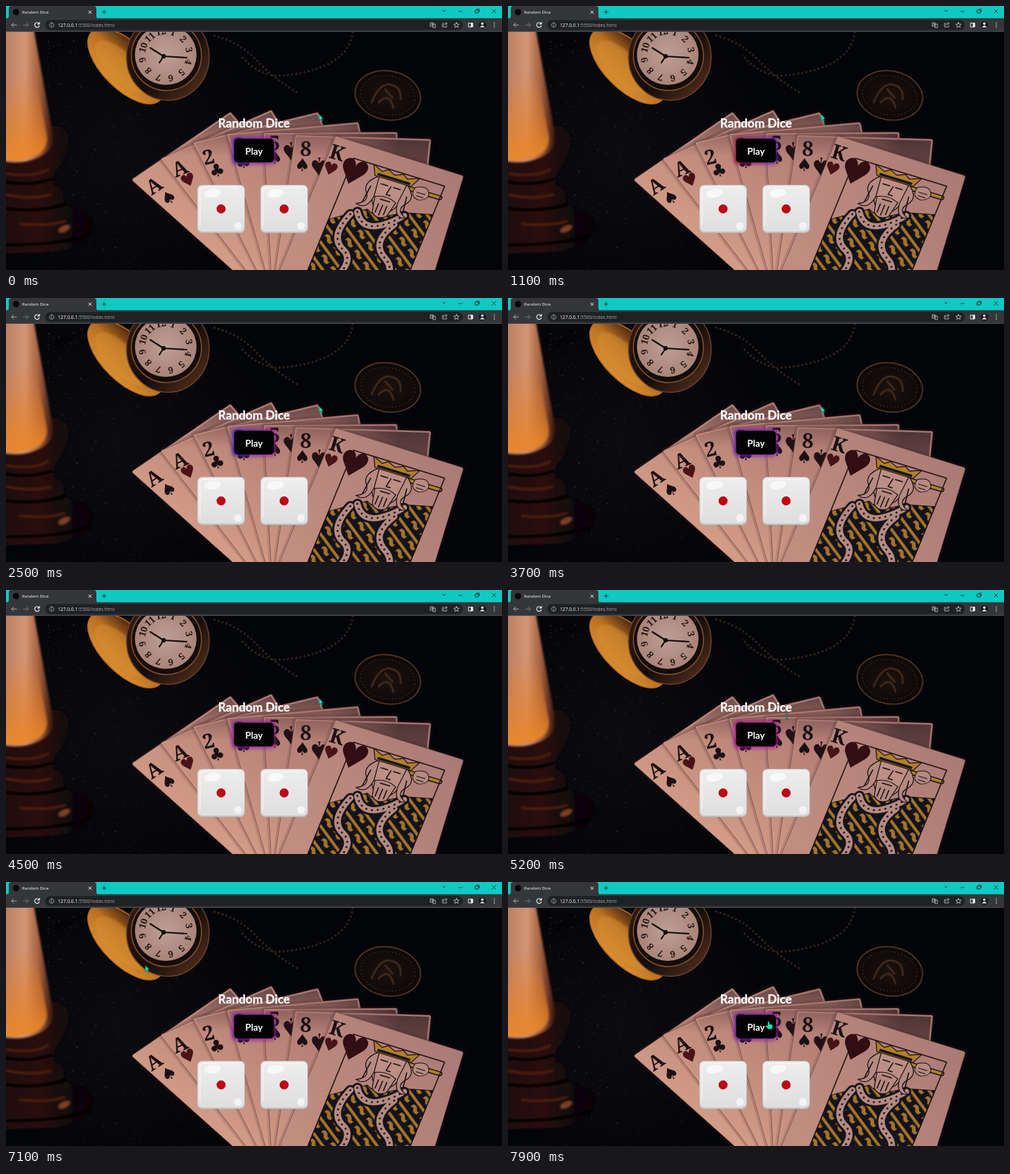
Write an HTML page that moves like this. It is 708 px wide and 378 px high and loops after 8000 ms.

```html
<!DOCTYPE html>
<html lang="en">
<head>
<meta charset="utf-8">
<title>Random Dice</title>
<style>
  html, body { margin: 0; width: 100%; height: 100%; overflow: hidden; background: #030408; }
  svg { display: block; width: 708px; height: 378px; }
  .ui { font-family: "Open Sans", "Noto Sans", sans-serif; }
  .page { font-family: Lato, sans-serif; font-weight: 700; fill: #fff; text-anchor: middle; }
  .rank { font-family: "Noto Serif", serif; font-weight: 600; text-anchor: middle; }
  .suit { font-family: "DejaVu Sans", sans-serif; text-anchor: middle; }
  .line { fill: none; stroke-linecap: round; stroke-linejoin: round; }
</style>
</head>
<body>
<svg viewBox="0 0 708 378">
  <defs>
    <radialGradient id="table" gradientUnits="userSpaceOnUse" cx="160" cy="210" r="230">
      <stop stop-color="#0b0b10"/><stop offset="1" stop-color="#030408"/>
    </radialGradient>
    <linearGradient id="wax">
      <stop stop-color="#b87a5e"/><stop offset=".45" stop-color="#d39574"/>
      <stop offset=".72" stop-color="#a3603f"/><stop offset="1" stop-color="#33140d"/>
    </linearGradient>
    <linearGradient id="waxGlow" x2="0" y2="1">
      <stop offset=".35" stop-color="#e67a20" stop-opacity="0"/><stop offset="1" stop-color="#e8872c"/>
    </linearGradient>
    <linearGradient id="wood">
      <stop stop-color="#210d0a"/><stop offset=".4" stop-color="#2b100b"/>
      <stop offset=".7" stop-color="#120707"/><stop offset="1" stop-color="#060406"/>
    </linearGradient>
    <linearGradient id="lid" x2="0" y2="1">
      <stop stop-color="#45220e"/><stop offset=".45" stop-color="#b66d1f"/><stop offset="1" stop-color="#d98e31"/>
    </linearGradient>
    <linearGradient id="case" x2="1" y2="1">
      <stop stop-color="#3c2014"/><stop offset=".55" stop-color="#150c0b"/><stop offset="1" stop-color="#5e3620"/>
    </linearGradient>
    <radialGradient id="dial"><stop stop-color="#bd9f95"/><stop offset="1" stop-color="#a98478"/></radialGradient>
    <radialGradient id="coin"><stop stop-color="#1d120e"/><stop offset="1" stop-color="#0c0809"/></radialGradient>
    <linearGradient id="paper" gradientUnits="userSpaceOnUse" x1="340" y1="378" x2="480" y2="160">
      <stop stop-color="#d29c86"/><stop offset=".5" stop-color="#bd867a"/><stop offset="1" stop-color="#a87470"/>
    </linearGradient>
    <linearGradient id="front" gradientUnits="userSpaceOnUse" x1="420" y1="360" x2="650" y2="230">
      <stop stop-color="#c08d80"/><stop offset="1" stop-color="#a97a75"/>
    </linearGradient>
    <linearGradient id="shade" gradientUnits="userSpaceOnUse" x1="0" y1="145" x2="0" y2="215">
      <stop stop-color="#12080c" stop-opacity=".5"/><stop offset="1" stop-color="#12080c" stop-opacity="0"/>
    </linearGradient>
    <linearGradient id="farShade" gradientUnits="userSpaceOnUse" x1="460" y1="0" x2="560" y2="0">
      <stop stop-color="#12080c" stop-opacity="0"/><stop offset="1" stop-color="#12080c" stop-opacity=".5"/>
    </linearGradient>
    <pattern id="robe" width="22" height="20" patternUnits="userSpaceOnUse" patternTransform="rotate(35)">
      <path fill="#15131a" d="M0 0h22v20H0z"/>
      <path fill="#a1732b" d="M0 0h22v4H0zM3 8q5-3 9 0t6 0v5q-5 3-8 0t-7 0z"/>
    </pattern>
    <linearGradient id="dieFace" x2="0" y2="1">
      <stop stop-color="#ededed"/><stop offset="1" stop-color="#dfdfdf"/>
    </linearGradient>
    <linearGradient id="glowFill"><stop/><stop offset="1"/></linearGradient>
    <filter id="blur" x="-30%" y="-40%" width="160%" height="180%"><feGaussianBlur stdDeviation="2.6"/></filter>
    <filter id="soft"><feGaussianBlur stdDeviation="1.6"/></filter>
    <g id="die">
      <rect width="68" height="69" rx="7" fill="#bfc2c3"/>
      <rect x="1" y="1" width="66" height="66" rx="6" fill="url(#dieFace)"/>
      <path class="line" stroke="#fafafa" d="M4 58V9q0-5 5-5h49"/>
      <ellipse cx="22" cy="12" rx="12" ry="6" fill="#f8f8f8" transform="rotate(-8 22 12)"/>
      <circle cx="58" cy="59" r="5.5" fill="#f3f3f3"/>
      <circle cx="34" cy="34.5" r="6.5" fill="#bd0713"/>
    </g>
  </defs>

  <path fill="url(#table)" d="M0 0h708v378H0z"/>
  <g id="specks"></g>

  <!-- candle and holder -->
  <g filter="url(#soft)">
    <path fill="url(#wood)" d="M0 172H74Q92 178 89 198L80 226Q66 238 67 256Q82 262 82 272Q80 282 92 288Q122 294 124 312Q122 344 68 352L0 354Z"/>
    <path class="line" stroke="#54240f" stroke-width="2.5" d="M0 240Q40 246 60 234M0 270Q36 278 64 270M20 312Q60 316 84 308"/>
    <path class="line" stroke="#060405" stroke-width="5" d="M0 252Q36 258 64 248M0 290Q46 296 84 284M0 342Q80 342 118 328"/>
    <ellipse cx="83" cy="319" rx="9" ry="4" fill="#7c4027" transform="rotate(-25 83 319)"/>
  </g>
  <g filter="url(#soft)">
    <path fill="url(#wax)" d="M-6 30H39L67 184Q69 206 48 216Q24 228 -6 222Z"/>
    <path fill="url(#waxGlow)" d="M-6 30H30L58 186Q60 206 42 214Q24 224 -6 220Z"/>
  </g>

  <!-- chain, watch, coin -->
  <g fill="none" stroke="#2f2018" stroke-width="3" stroke-dasharray="3 3">
    <path d="M296 42Q334 52 358 78T418 125"/>
    <path d="M495 36Q492 66 462 82T384 100Q352 94 335 70"/>
  </g>
  <g transform="rotate(45 171 86)">
    <ellipse cx="171" cy="86" rx="69" ry="33" fill="url(#lid)" stroke="#b8691f" stroke-width="1.5"/>
    <ellipse cx="168" cy="91" rx="50" ry="20" fill="#d89236" opacity=".5" filter="url(#soft)"/>
  </g>
  <ellipse cx="231" cy="73" rx="59" ry="62" fill="url(#case)" stroke="#6a4027" stroke-width="1.5"/>
  <ellipse cx="229" cy="71" rx="50" ry="50" fill="#150c0b" stroke="#80522f" stroke-width="1.5"/>
  <ellipse cx="228" cy="70" rx="44" ry="43" fill="url(#dial)"/>
  <g id="numerals" class="rank" font-size="13" fill="#20130f"></g>
  <path class="line" stroke="#150d0b" stroke-width="2.2" d="M225 72L206 60M225 72L258 74M225 72L219 81"/>
  <circle cx="225" cy="72" r="3.2" fill="#150d0b"/>
  <g transform="rotate(10 545 128)">
    <ellipse cx="545" cy="128" rx="47" ry="35" fill="url(#coin)" stroke="#4c3022" stroke-width="2"/>
    <ellipse cx="545" cy="128" rx="39" ry="28" fill="none" stroke="#2f1d15" stroke-width="2" stroke-dasharray="2 3"/>
    <path class="line" stroke="#3d271b" stroke-width="3" d="M524 142Q530 112 546 112T564 130M534 140Q546 122 556 144M540 120L552 130"/>
  </g>

  <g id="cards"></g>

  <!-- king, in the slanted coordinates of the front card -->
  <g transform="matrix(.956 .294 -.378 .927 470 187)" stroke-linejoin="round">
    <path fill="url(#robe)" stroke="#161016" d="M36 116L82 86Q100 98 130 76L172 66V270H36Z"/>
    <path class="line" stroke="#15131a" stroke-width="15" d="M70 94Q92 128 134 80M62 100Q46 140 72 152T66 215M126 96Q104 130 132 146T138 215"/>
    <path class="line" stroke="#b58a80" stroke-width="9" d="M70 94Q92 128 134 80M62 100Q46 140 72 152T66 215M126 96Q104 130 132 146T138 215"/>
    <path class="line" stroke="#26202c" stroke-width="3" stroke-dasharray=".1 8" d="M70 94Q92 128 134 80M62 100Q46 140 72 152T66 215M126 96Q104 130 132 146T138 215"/>
    <path class="line" stroke="#15131a" stroke-width="7" d="M122 40H172"/>
    <path class="line" stroke="#b07f2b" stroke-width="4" d="M122 40H172"/>
    <g transform="translate(100 48) scale(1.25) translate(-97 -52)">
      <path fill="#bd8f84" stroke="#1b1114" d="M81 42H114V62Q112 80 97 82Q83 78 81 62Z"/>
      <path fill="#b58a80" stroke="#1b1114" d="M81 42Q66 54 74 64T68 80Q82 84 84 66ZM114 42Q130 54 121 64T128 80Q114 84 112 66ZM85 66Q97 60 110 66L106 84Q97 92 89 84Z"/>
      <path class="line" stroke="#1b1114" stroke-width="1.3" d="M86 50h8M101 50h8M98 50l-2 10h5M92 67h11M92 73v10M97 73v12M102 73v10M76 56l-2 20M119 56l3 20"/>
      <path fill="#b07f2b" stroke="#1b1114" d="M76 43L70 31L82 36L88 32L97 36L106 32L112 36L125 31L119 43Z"/>
      <path fill="#1b1416" d="M78 39H117V42H78Z"/>
    </g>
    <path fill="#b58a80" stroke="#1b1114" d="M134 36q14-8 20 1t-8 15q-16 0-12-16zM138 42h13M139 47h11"/>
    <path fill="none" stroke="#241316" stroke-width="1.6" d="M36 270V22H172V270"/>
    <text class="suit" font-size="50" fill="#310e12" x="43" y="59">♥</text>
  </g>

  <!-- page -->
  <g class="page">
    <text x="354" y="174.3" font-size="17.3" stroke="#fff" stroke-width=".3">Random Dice</text>
    <rect x="322.5" y="187.5" width="62" height="39" rx="6" fill="url(#glowFill)" opacity=".85" filter="url(#blur)"/>
    <rect x="325.5" y="190" width="57" height="34" rx="5.5" fill="#030304"/>
    <text x="354" y="212.5" font-size="13.3">Play</text>
  </g>
  <use href="#die" x="273" y="256"/>
  <use href="#die" x="363" y="256"/>

  <!-- browser -->
  <g class="ui">
    <path fill="#10c9c3" d="M0 0h708v18H0z"/>
    <path fill="#35363a" d="M0 17.5h708V37H0zM1 18q3 0 3-4V4q0-4 4-4H125q4 0 4 4V14q0 4 3 4z"/>
    <rect x="56" y="20" width="596" height="14.5" rx="7.2" fill="#202124"/>
    <path fill="#4a4b4f" d="M0 36h708v1H0z"/>
    <circle cx="14.3" cy="8.8" r="4.5" fill="#08080a"/>
    <text x="23" y="11" font-size="6.1" fill="#fff">Random Dice</text>
    <text x="74" y="29.7" font-size="6.7" fill="#a4a8ad"><tspan fill="#fff">127.0.0.1</tspan>:5500/index.html</text>
    <g class="line" stroke="#e8eaed">
      <path d="M118 6.8l4 4m0-4l-4 4"/>
      <path stroke="#123c3c" d="M137 8.7h6m-3-3v6M623 6l2 2 2-2M646 8h5M694 5l5 5m0-5l-5 5M670 6h4v4h-4zM671.5 4.5h4v4"/>
      <path stroke="#a8abb0" d="M15 27.2H8m3-3l-3 3 3 3"/>
      <path stroke="#707378" d="M25 27.2h7m-3-3l3 3-3 3"/>
      <path stroke-width="1.2" d="M47 25a3.4 3.4 0 1 0 .5 3.5M47.8 23.3v2.5h-2.5"/>
      <path stroke="#b4b7bb" stroke-width=".8" d="M65.3 24a3.2 3.2 0 1 0 .1 0M65.3 27v2M65.3 25.5v.1"/>
      <path stroke="#c2c5c9" stroke-width=".8" d="M606 24h4v5h-4zM609 26h4v5h-3zM607 26h2M625 25h-2v5h6v-2M624.5 28q0-3 5-3m-2-2l2 2-2 2"/>
      <path stroke="#d0d3d6" stroke-width=".8" d="M643 23.4l1.1 2.5 2.7.2-2.1 1.8.7 2.7-2.4-1.4-2.4 1.4.7-2.7-2.1-1.8 2.7-.2z"/>
      <path d="M660.5 24.5h5.5v5.5h-5.5zM664.5 25v5"/>
    </g>
    <path fill="#eee" d="M663.5 24.5h3v5.5h-3z"/>
    <circle cx="680" cy="27.2" r="5.3" fill="#17181a"/>
    <path fill="#fff" d="M680 23.4a1.8 1.8 0 1 1-.1 0zM676.5 30.5q3.5-5 7 0z"/>
    <path class="line" stroke="#e8eaed" stroke-width="1.5" d="M697 24.2v.01M697 27.2v.01M697 30.2v.01"/>
  </g>

  <g id="pointer">
    <path id="arrow" fill="#12e4b4" stroke="#06443a" stroke-width=".5" d="M0 0V9L2 7.2L3.6 10.4L5 9.7L3.5 6.6H6Z"/>
    <path id="beam" class="line" stroke="#0b7558" stroke-width="1.2" d="M-2-4.5Q0-4.5 0-3.5Q0-4.5 2-4.5M0-3.5V3.5M-2 4.5Q0 4.5 0 3.5Q0 4.5 2 4.5"/>
    <path id="hand" fill="#12e4b4" d="M0 0Q1.4-1 1.7.5L2 3.5L6 4.5Q6.8 5 6.5 7.5L5.4 10.5H.5L-2.8 6.8Q-3 5.5-2 5.2L-.2 6Z"/>
  </g>
</svg>

<script>
const LOOP = 8000, STEP = 100;
const byId = id => document.getElementById(id);
const add = (id, markup) => byId(id).insertAdjacentHTML('beforeend', markup);

// Grain of the table, lit near the candle and fading to the right.
function buildTable() {
  let seed = 11, dots = '';
  const random = () => (seed = seed * 16807 % 2147483647) / 2147483647;
  for (let i = 0; i < 1100; i++) {
    const x = 60 + 640 * random() ** 1.8, y = 40 + 338 * random();
    const alpha = random() * (x < 260 ? .55 : .18);
    dots += `<circle cx="${x.toFixed(1)}" cy="${y.toFixed(1)}" r="${(.4 + .5 * random()).toFixed(1)}" fill="#695a52" opacity="${alpha.toFixed(2)}"/>`;
  }
  add('specks', dots);
}

function buildDial() {
  for (let n = 1; n <= 12; n++) {
    const turn = n * 30 - 12, a = turn * Math.PI / 180;
    add('numerals', `<text transform="translate(${228 + 34 * Math.sin(a)} ${70 - 34 * Math.cos(a)}) rotate(${turn})" y="4.7">${n}</text>`);
  }
}

const glyph = (kind, char, x, y, size, turn, fill) =>
  `<text class="${kind}" font-size="${size}" fill="${fill}" transform="translate(${x} ${y}) rotate(${turn})" y="${size * .36}">${char}</text>`;

function buildCards() {
  const INK = '#1b1013', RED = '#4a1317', PIP = '#221014';
  // top left, top right, left edge at the stage bottom, rank, suit, partly covered pip
  const cards = [
    [181, 247, 322, 153, 327, 'A', 211, 257, '♠', 232, 274],
    [222, 218, 380, 150, 345, 'A', 248, 232, '♥', 260, 249],
    [268, 195, 446, 153, 360, '2', 289, 216, '♣', 301, 235],
    [316, 183, 503, 167, 372, '3', 333, 199, '♣', 339, 223],
    [368, 182, 558, 181, 380, '5', 383, 196, '♠', 384, 217, 407, 208],
    [413, 185, 606, 191, 386, '8', 428, 204, '♠', 423, 227, 447, 230],
    [470, 187, 652, 243, 392, 'K', 473, 210, '♥', 463, 233],
  ];
  for (const [x, y, rx, ry, bx, rank, kx, ky, suit, sx, sy, px, py] of cards) {
    const dx = (bx - x) * 1.6, dy = (378 - y) * 1.6;
    const turn = Math.atan2(ry - y, rx - x) * 180 / Math.PI;
    const isFront = rank === 'K', paper = isFront ? 'url(#front)' : 'url(#paper)';
    const outline = `points="${x + 2},${y + 2} ${rx - 2},${ry + 2} ${rx + dx * .75},${ry + dy} ${x + dx},${y + dy}" stroke-linejoin="round"`;
    add('cards',
      `<polygon ${outline} fill="none" stroke="#3a1c1c" stroke-width="12" opacity=".15"/>` +
      `<polygon ${outline} fill="none" stroke="#70494a" stroke-width="5.6"/>` +
      `<polygon ${outline} fill="${paper}" stroke="${paper}" stroke-width="4.2"/>` +
      (isFront ? '' : `<polygon ${outline} fill="url(#shade)"/><polygon ${outline} fill="url(#farShade)"/>`) +
      glyph('rank', rank, kx, ky, 29, turn, INK) +
      glyph('suit', suit, sx, sy, 25, turn, suit === '♥' ? RED : INK) +
      (px ? glyph('suit', '♠', px, py, 36, turn + 180, PIP) : ''));
  }
}

const animations = [];
function track(element, property, steps, easing = 'linear') {
  const frames = steps.map(([time, value]) => ({ [property]: value, offset: time / LOOP, easing }));
  const animation = element.animate(frames, { duration: LOOP, fill: 'both' });
  animation.pause();
  animations.push(animation);
}

function buildMotion() {
  const path = [
    [0, 447, 155], [5000, 447, 155], [5200, 398, 181], [5400, 380, 180], [5900, 110, 84],
    [6200, 85, 45], [6400, 85, 45], [6700, 62, 30], [6900, 62, 30],
    [7400, 404, 253], [7700, 371, 200], [LOOP, 371, 200],
  ];
  track(byId('pointer'), 'transform', path.map(([t, x, y]) => [t, `translate(${x}px, ${y}px)`]));

  const kinds = [[0, 'arrow'], [5200, 'beam'], [5500, 'arrow'], [7600, 'hand'], [LOOP, 'hand']];
  for (const name of ['arrow', 'beam', 'hand'])
    track(byId(name), 'opacity', kinds.map(([t, kind]) => [t, +(kind === name)]), 'step-end');

  const glow = [
    [0, '#5c1cb8', '#991cb0'], [1100, '#8c1838', '#641cc0'], [2500, '#3d20c8', '#a01c98'],
    [3700, '#6018b8', '#851cb4'], [5200, '#a010a0', '#b0109c'], [6300, '#9410a8', '#9c10a0'],
    [LOOP, '#6c14b0', '#9418a8'],
  ];
  document.querySelectorAll('#glowFill stop').forEach((stop, i) =>
    track(stop, 'stopColor', glow.map(row => [row[0], row[i + 1]])));
}

buildTable();
buildDial();
buildCards();
buildMotion();

const start = performance.now();
function draw() {
  const elapsed = Math.max(0, performance.now() - start) % LOOP;
  const time = Math.floor(elapsed / STEP) * STEP;
  for (const animation of animations) animation.currentTime = time;
  requestAnimationFrame(draw);
}
draw();
</script>
</body>
</html>
```
